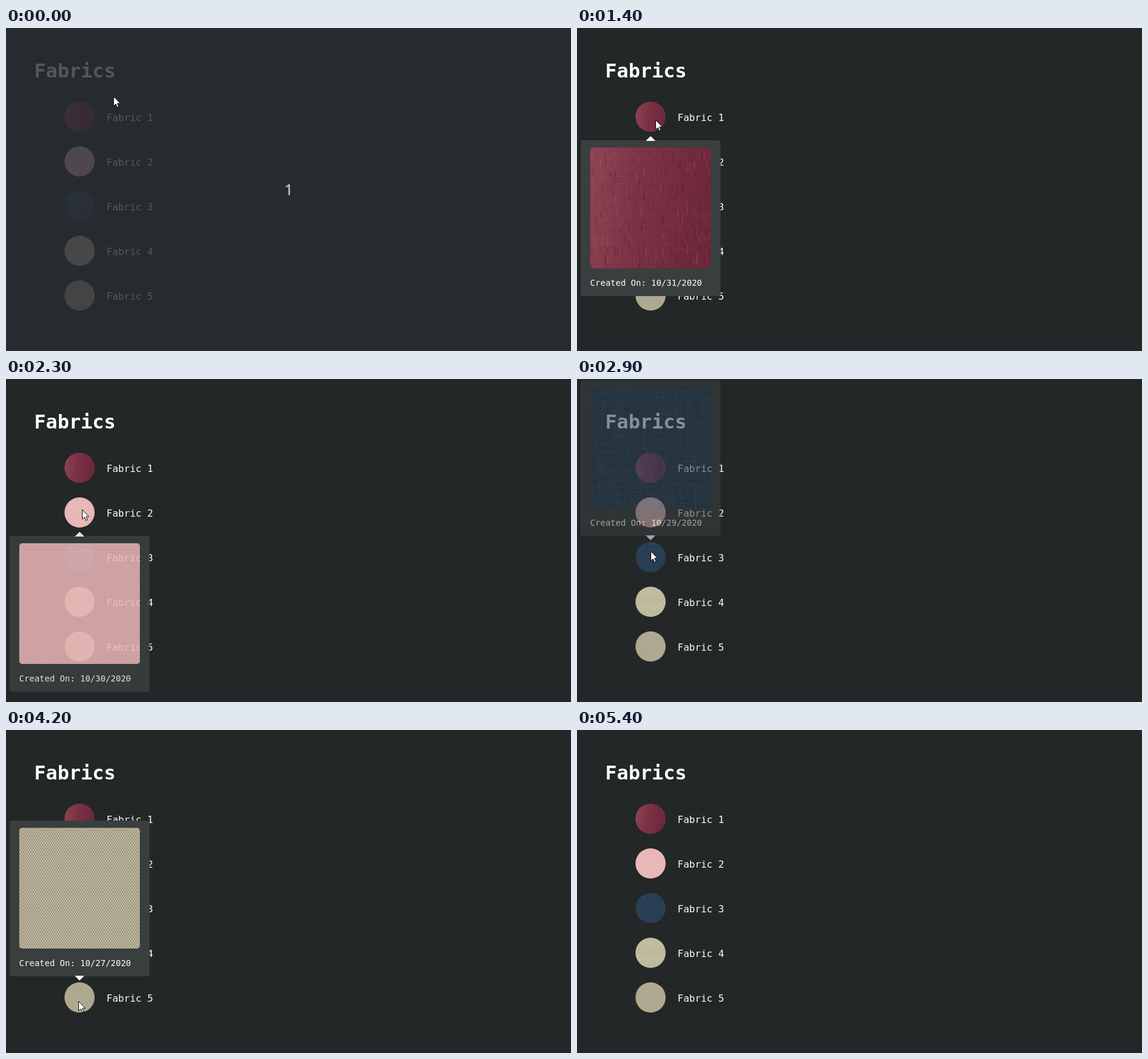
Recreate the animation shown at these times as an HTML page. Size 937x535 px, loop 6 s.

```html
<!DOCTYPE html>
<html lang="en">
<head>
<meta charset="utf-8">
<title>Fabrics</title>
<style>
  html, body { margin: 0; width: 100%; height: 100%; overflow: hidden; background: #232727; }
  svg { display: block; }
  text { font-family: "DejaVu Sans Mono", monospace; fill: #fff; white-space: pre; }
</style>
</head>
<body>
<svg id="stage" width="937" height="535" viewBox="0 0 937 535">
  <defs>
    <clipPath id="round"><circle cx="100" cy="100" r="100"/></clipPath>
    <clipPath id="card"><rect width="200" height="200" rx="5"/></clipPath>
    <linearGradient id="wine" x2="1" y2=".15">
      <stop offset="0" stop-color="#974a5b"/>
      <stop offset=".45" stop-color="#803346"/>
      <stop offset="1" stop-color="#70283b"/>
    </linearGradient>
    <pattern id="knit" width="4" height="4" patternUnits="userSpaceOnUse">
      <path d="M.4 0l1.4 2.2M3.5 1.4L2.3 3.4" stroke="#45101f" stroke-width="1" opacity=".45"/>
      <path d="M0 2.6l.9 1.2M2.8 0l.7 .9" stroke="#d08a96" stroke-width=".8" opacity=".3"/>
    </pattern>
    <pattern id="twill" width="3" height="3" patternUnits="userSpaceOnUse">
      <path d="M0 0h1v1H0z" fill="#a8787a" opacity=".35"/>
      <path d="M1.5 1.5h1v1h-1z" fill="#ffd9d5" opacity=".35"/>
    </pattern>
    <pattern id="hatch" width="6" height="4" patternUnits="userSpaceOnUse">
      <path d="M0 4L6 0M0 0L6 4" stroke="#8f8b70" stroke-width=".8" opacity=".3"/>
    </pattern>
    <pattern id="dots" width="4" height="6" patternUnits="userSpaceOnUse">
      <path d="M.2 .5h1.9l-.4 1.5H.7zM2.2 3.5h1.9l-.4 1.5H2.7z" fill="#45453e" opacity=".6"/>
      <path d="M2.2 .5h1.6v1.3H2.2zM.2 3.5h1.6v1.3H.2z" fill="#dcd3b8" opacity=".45"/>
    </pattern>
    <g id="fab0"><rect width="200" height="200" fill="url(#wine)"/><rect width="200" height="200" fill="url(#knit)"/><g id="ribs"/></g>
    <g id="fab1"><rect width="200" height="200" fill="#eab7b8"/><rect width="200" height="200" fill="url(#twill)"/></g>
    <g id="fab2"><rect width="200" height="200" fill="#2b4054"/><g id="linen"/></g>
    <g id="fab3"><rect width="200" height="200" fill="#c7c2a5"/><rect width="200" height="200" fill="url(#hatch)"/><g id="lace"/></g>
    <g id="fab4"><rect width="200" height="200" fill="#b9b197"/><rect width="200" height="200" fill="url(#dots)"/></g>
  </defs>
  <text x="46.85" y="82" font-size="32" font-weight="700">Fabrics</text>
  <g id="list"></g>
  <g id="tips"></g>
  <g id="dim">
    <rect width="937" height="535" fill="#282c33" opacity=".8"/>
    <text x="469" y="277" text-anchor="middle" style="font:26px 'Noto Sans',sans-serif;fill:#d6d8d9">1</text>
  </g>
  <path id="cursor" d="M.5 .5V16.2L4.2 12.9L6.6 18.4L9.1 17.3L6.7 11.9H11.5Z" fill="#fff" stroke="#0b0c0c"/>
</svg>
<script>
const $ = id => document.getElementById(id);
const LOOP = 6000, STEP = 100, FADE = 300;

// Seeded random numbers for thread positions
let seed = 7;
const rnd = () => (seed = seed * 16807 % 2147483647) / 2147483647;
const repeat = (n, make) => Array.from({ length: n }, (_, i) => make(i)).join('');

$('ribs').innerHTML = repeat(420, i => {
  const x = Math.floor(rnd() * 50) * 4 + 1, y = rnd() * 200;
  return `<path d="M${x} ${y}v${4 + rnd() * 14}" stroke="${i % 3 ? '#4a1020' : '#b06a78'}" stroke-width="1.6" opacity="${rnd() * .3}"/>`;
});

$('linen').innerHTML = repeat(520, i => {
  const len = 10 + rnd() * 40, at = rnd() * 200, from = rnd() * 220 - 20;
  const d = i % 2 ? `M${from} ${at}h${len}` : `M${at} ${from}v${len}`;
  return `<path d="${d}" stroke="${rnd() < .55 ? '#1a2b3b' : '#4b6579'}" stroke-width=".9" opacity="${.15 + rnd() * .3}"/>`;
});

// Interlaced sine threads
function wave(x, amp, period, phase) {
  let d = '';
  for (let y = 0; y <= 200; y += 5)
    d += `${y ? 'L' : 'M'}${(x + amp * Math.sin(y / period * 2 * Math.PI + phase)).toFixed(1)} ${y}`;
  return d;
}
$('lace').innerHTML = repeat(14, i => {
  const x = i * 18 - 18, phase = i % 2 * Math.PI;
  return `<path d="${wave(x, 17, 104, phase)}" fill="none" stroke="#e4e2d2" stroke-width="1.3" opacity=".5"/>`
    + `<path d="${wave(x + 5, 17, 104, phase)}" fill="none" stroke="#8c8970" stroke-width="2" opacity=".3"/>`;
}) + repeat(20, i =>
  `<path d="M${i * 22 - 110} 55l60 60M${i * 22 - 110} 115l60 -60M${i * 22 - 110} 150l50 50M${i * 22 - 110} 200l50 -50" stroke="#858269" stroke-width="2" opacity=".22"/>`);

// Tooltips: panel top, side, date, fade-in and fade-out start
const tips = [
  { top: 186, below: true,  date: '10/31/2020', on: 1100, off: 1980 },
  { top: 260, below: true,  date: '10/30/2020', on: 2040, off: 2580 },
  { top: 2,   below: false, date: '10/29/2020', on: 2726, off: 3300 },
  { top: 76,  below: false, date: '10/28/2020', on: 3465, off: 3740 },
  { top: 150, below: false, date: '10/27/2020', on: 3790, off: 4800 }
];

$('list').innerHTML = repeat(5, i => `
  <g transform="translate(97 ${122 + 74 * i}) scale(.25)"><g clip-path="url(#round)"><use href="#fab${i}"/></g></g>
  <text x="166.85" y="${154 + 74 * i}" font-size="16">Fabric ${i + 1}</text>`);

$('tips').innerHTML = tips.map((tip, i) => `
  <g transform="translate(6 ${tip.top})">
    <rect width="232" height="258" rx="4" fill="#393f3f"/>
    <path d="${tip.below ? 'M108 1L116 -7L124 1Z' : 'M108 257L116 265L124 257Z'}" fill="#fff"/>
    <g transform="translate(16 12)" clip-path="url(#card)"><use href="#fab${i}"/></g>
    <text x="15.85" y="241" font-size="14">Created On: ${tip.date}</text>
  </g>`).join('');
const tipNodes = [...$('tips').children];

// Pointer path: time, x, y
const path = [
  [600, 178, 113], [900, 158, 131], [1100, 142, 142], [1300, 133, 149], [1400, 130, 152],
  [1800, 130, 152], [2000, 128, 186], [2100, 127, 204], [2300, 126, 216], [2500, 125, 228],
  [2700, 123, 266], [2900, 122, 285], [3200, 122, 309], [3400, 121, 336], [3600, 121, 355],
  [3700, 121, 380], [3800, 121, 414], [3900, 120, 432], [4100, 120, 447], [4500, 120, 453],
  [4700, 120, 453], [4800, 94, 454], [5000, 17, 441], [5100, 4, 16]
];

function pointer(t) {
  const k = path.findIndex(p => p[0] > t);
  if (k < 1) return path[k ? path.length - 1 : 0].slice(1);
  const [a, b] = [path[k - 1], path[k]];
  const f = (t - a[0]) / (b[0] - a[0]);
  return [a[1] + (b[1] - a[1]) * f, a[2] + (b[2] - a[2]) * f];
}

const ramp = (t, start) => Math.min(1, Math.max(0, (t - start) / FADE));

function show(node, visible) {
  node.setAttribute('visibility', visible ? 'visible' : 'hidden');
}

function draw(now) {
  const t = Math.floor(now % LOOP / STEP) * STEP;
  tips.forEach((tip, i) => {
    const alpha = Math.max(0, ramp(t, tip.on) - ramp(t, tip.off));
    tipNodes[i].setAttribute('opacity', alpha);
    show(tipNodes[i], alpha > 0);
  });
  const [x, y] = pointer(t).map(Math.round);
  $('cursor').setAttribute('transform', `translate(${x} ${y})`);
  show($('cursor'), t < 5100 || t === 5300);
  show($('dim'), t < 100);
}

const start = performance.now();
function tick() {
  draw(performance.now() - start);
  requestAnimationFrame(tick);
}
tick();
</script>
</body>
</html>
```
